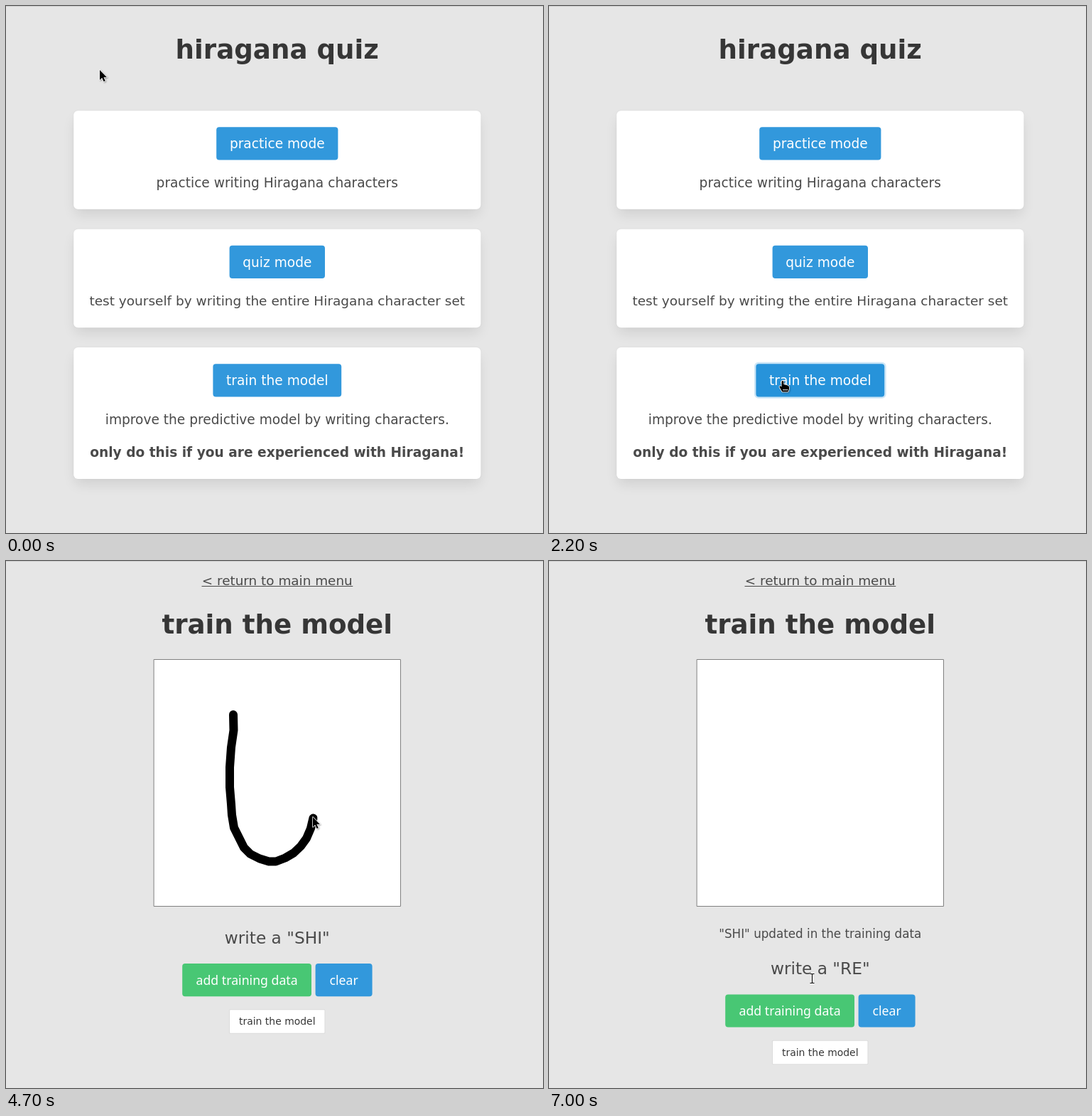
Write an HTML page with a canvas that moves like this. It is 756 by 741 pixels and loops after 8 s.

```html
<!DOCTYPE html>
<html lang="en">
<head>
<meta charset="utf-8">
<title>hiragana quiz</title>
<style>
  html, body { margin: 0; width: 100%; height: 100%; overflow: hidden; background: #e6e6e6; }
  canvas { display: block; }
</style>
</head>
<body>
<canvas id="stage" width="756" height="741"></canvas>
<script>
const ctx = document.getElementById('stage').getContext('2d');
const LOOP = 8000, STEP = 100, MID = 381.75;
const SANS = '"DejaVu Sans", sans-serif';
const BUTTON_FONT = '"Noto Sans", "Open Sans", sans-serif';
const BLUE = { base: '#3298dc', hover: '#2793da', active: '#238cd1', ring: 'rgba(50,152,220,.25)' };
const GREEN = { base: '#48c774', hover: '#3ec46d', active: '#3abb67', ring: 'rgba(72,199,116,.25)' };

// Pointer hotspot: time, x, y
const POINTER = [
  [300, 132, 90], [600, 154, 148], [1200, 237, 371], [1300, 252, 410],
  [1500, 292, 486], [1600, 312, 513], [1800, 331, 531], [3700, 331, 531],
  [3900, 320, 216], [4000, 320, 216]
];
const POINTER_AFTER = [
  [5700, 432, 360], [5900, 391, 435], [6000, 391, 435], [6200, 378, 243],
  [6400, 373, 540], [6500, 370.5, 587]
];
const STROKE = [
  [320, 216], [320.5, 238], [317, 262], [315, 290], [315, 318], [317, 342],
  [318, 357], [321, 375], [328, 389], [335, 403], [344, 412], [357, 418.5],
  [370, 422.5], [380, 422.5], [393, 417.5], [405, 410.5], [415, 401],
  [423, 390], [429, 376], [432.5, 361.5]
];

function along(keys, t) {
  if (t <= keys[0][0]) return keys[0].slice(1);
  for (let i = 1; i < keys.length; i++) {
    const a = keys[i - 1], b = keys[i];
    if (t <= b[0]) {
      const k = (t - a[0]) / (b[0] - a[0]);
      return [a[1] + (b[1] - a[1]) * k, a[2] + (b[2] - a[2]) * k];
    }
  }
  return keys[keys.length - 1].slice(1);
}

function strokePart(progress) {
  const dist = (a, b) => Math.hypot(b[0] - a[0], b[1] - a[1]);
  let total = 0;
  for (let i = 1; i < STROKE.length; i++) total += dist(STROKE[i - 1], STROKE[i]);
  let left = total * progress;
  const points = [STROKE[0]];
  for (let i = 1; i < STROKE.length && left > 0; i++) {
    const a = STROKE[i - 1], b = STROKE[i], d = dist(a, b), k = Math.min(1, left / d);
    points.push([a[0] + (b[0] - a[0]) * k, a[1] + (b[1] - a[1]) * k]);
    left -= d;
  }
  return points;
}

function text(str, x, y, size, color = '#4a4a4a', weight = '', family = SANS) {
  ctx.font = `${weight} ${size}px ${family}`;
  ctx.textAlign = 'center';
  ctx.fillStyle = color;
  ctx.fillText(str, x, y);
}

function box(x, y, w, h, r, color) {
  ctx.beginPath();
  ctx.roundRect(x, y, w, h, r);
  ctx.fillStyle = color;
  ctx.fill();
}

function card(y, h) {
  const x = 95.2, w = 573.2;
  ctx.save();
  ctx.shadowColor = 'rgba(10,10,10,.1)';
  ctx.shadowBlur = 18.6;
  ctx.shadowOffsetY = 9.3;
  box(x + 2.3, y + 2.3, w - 4.6, h - 4.6, 5, '#fff');
  ctx.restore();
  box(x - 1, y - 1, w + 2, h + 2, 7, 'rgba(10,10,10,.02)');
  box(x, y, w, h, 6, '#fff');
}

function button(label, x, y, w, palette, state = 'base', family = SANS) {
  const h = 46.2;
  if (state === 'focus') box(x - 2.4, y - 2.4, w + 4.8, h + 4.8, 6, palette.ring);
  box(x, y, w, h, 4, palette[state === 'focus' ? 'hover' : state]);
  const custom = family !== SANS;
  text(label, x + w / 2, y + (custom ? 29.7 : 29.8), custom ? 17.7 : 18.6, '#fff', '', family);
}

function drawMenu(state) {
  text('hiragana quiz', MID, 74, 37.2, '#363636', 'bold');
  card(147.2, 138.6);
  card(313.7, 138.6);
  card(480.1, 184.8);
  button('practice mode', 296.2, 170.3, 171.2, BLUE);
  button('quiz mode', 314.6, 336.8, 134.4, BLUE);
  button('train the model', 291.4, 503.2, 180.8, BLUE, state);
  text('practice writing Hiragana characters', MID, 255, 18.6);
  text('test yourself by writing the entire Hiragana character set', MID, 421, 18.5);
  text('improve the predictive model by writing characters.', MID, 588, 18.6);
  text('only do this if you are experienced with Hiragana!', MID, 634, 18.6, '#4a4a4a', 'bold');
}

function drawTrainer(kana, state, saved) {
  const shift = saved ? 43.4 : 0;
  text('< return to main menu', MID, 33.5, 18.4);
  ctx.fillRect(275.5, 35, 212.8, 1);
  text('train the model', MID, 102, 37.2, '#363636', 'bold');
  ctx.fillStyle = '#fff';
  ctx.fillRect(208, 138, 348, 348);
  ctx.strokeStyle = '#808080';
  ctx.lineWidth = 1;
  ctx.strokeRect(208.5, 138.5, 347, 347);
  if (saved) text('"SHI" updated in the training data', MID, 530, 16.74);
  text(`write a "${kana}"`, MID, 538 + shift, 23.25);
  button('add training data', 248.2, 566 + shift, 181.8, GREEN, state, BUTTON_FONT);
  button('clear', 435.6, 566 + shift, 80, BLUE, 'base', BUTTON_FONT);
  box(314, 630.3 + shift, 135.5, 34.5, 2, '#dbdbdb');
  box(315, 631.3 + shift, 133.5, 32.5, 1, '#fff');
  text('train the model', MID, 652.4 + shift, 13.95, '#363636');
}

function drawStroke(points) {
  ctx.beginPath();
  ctx.moveTo(...points[0]);
  ctx.lineTo(...points[0]);
  points.forEach(p => ctx.lineTo(...p));
  ctx.strokeStyle = '#000';
  ctx.lineWidth = 12;
  ctx.lineCap = ctx.lineJoin = 'round';
  ctx.stroke();
}

const SHAPES = {
  arrow: new Path2D('M0 0V14L3.2 11L5.6 16.2L7.8 15.2L5.4 10.2H10Z'),
  hand: new Path2D('M-3.5-3Q-2-5-.6-3V1L5 2.4Q7 3 7 5V8L5.5 11.5H-2.5L-6.5 5Q-7 3-5 3.2L-3.5 4.6Z'),
  beam: new Path2D('M-3-6.5H-1L0-6L1-6.5H3M0-6V6M-3 6.5H-1L0 6L1 6.5H3')
};

function drawCursor(kind, x, y) {
  const shape = SHAPES[kind];
  ctx.save();
  ctx.translate(x, y);
  ctx.lineJoin = 'round';
  ctx.lineCap = 'butt';
  ctx.strokeStyle = '#fff';
  if (kind === 'beam') {
    ctx.lineWidth = 2.6;
    ctx.stroke(shape);
    ctx.strokeStyle = '#000';
    ctx.lineWidth = 1.1;
    ctx.stroke(shape);
  } else {
    ctx.shadowColor = 'rgba(0,0,0,.35)';
    ctx.shadowBlur = 2;
    ctx.shadowOffsetX = ctx.shadowOffsetY = 1;
    ctx.lineWidth = 1.5;
    ctx.stroke(shape);
    ctx.shadowColor = 'transparent';
    ctx.fillStyle = '#000';
    ctx.fill(shape);
    if (kind === 'hand') {
      ctx.fillStyle = '#fff';
      ctx.fillRect(-2, 8.3, 7.5, 1);
    }
  }
  ctx.restore();
}

function buttonState(t, hover, press) {
  if (t < hover) return 'base';
  if (t < press) return 'hover';
  return t < press + STEP ? 'active' : 'focus';
}

function draw(t) {
  ctx.fillStyle = '#e6e6e6';
  ctx.fillRect(0, 0, 756, 741);
  ctx.fillStyle = '#cfcfcf';
  ctx.fillRect(0, 0, 756, 1);

  let cursor = 'arrow';
  let pos = along(t < 5000 ? POINTER : POINTER_AFTER, t);
  if (t < 2300) {
    const state = buttonState(t, 1600, 2100);
    drawMenu(state);
    if (state !== 'base') cursor = 'hand';
  } else if (t < 7000) {
    const state = buttonState(t, 6500, 6700);
    drawTrainer('SHI', state, false);
    if (t >= 4000) {
      const progress = t >= 4700 ? 1 : Math.min(0.985, (t - 3950) / 650);
      const points = strokePart(progress);
      drawStroke(points);
      if (t < 5000) pos = t >= 4600 ? [432, 360] : points[points.length - 1];
    }
    if (t < 3800) cursor = 'beam';
    if (state !== 'base') cursor = 'hand';
  } else {
    drawTrainer('RE', 'base', true);
    cursor = 'beam';
  }
  drawCursor(cursor, ...pos);
}

const start = performance.now();
function frame() {
  const t = (performance.now() - start) % LOOP;
  draw(Math.floor(t / STEP) * STEP);
  requestAnimationFrame(frame);
}
frame();
</script>
</body>
</html>
```
